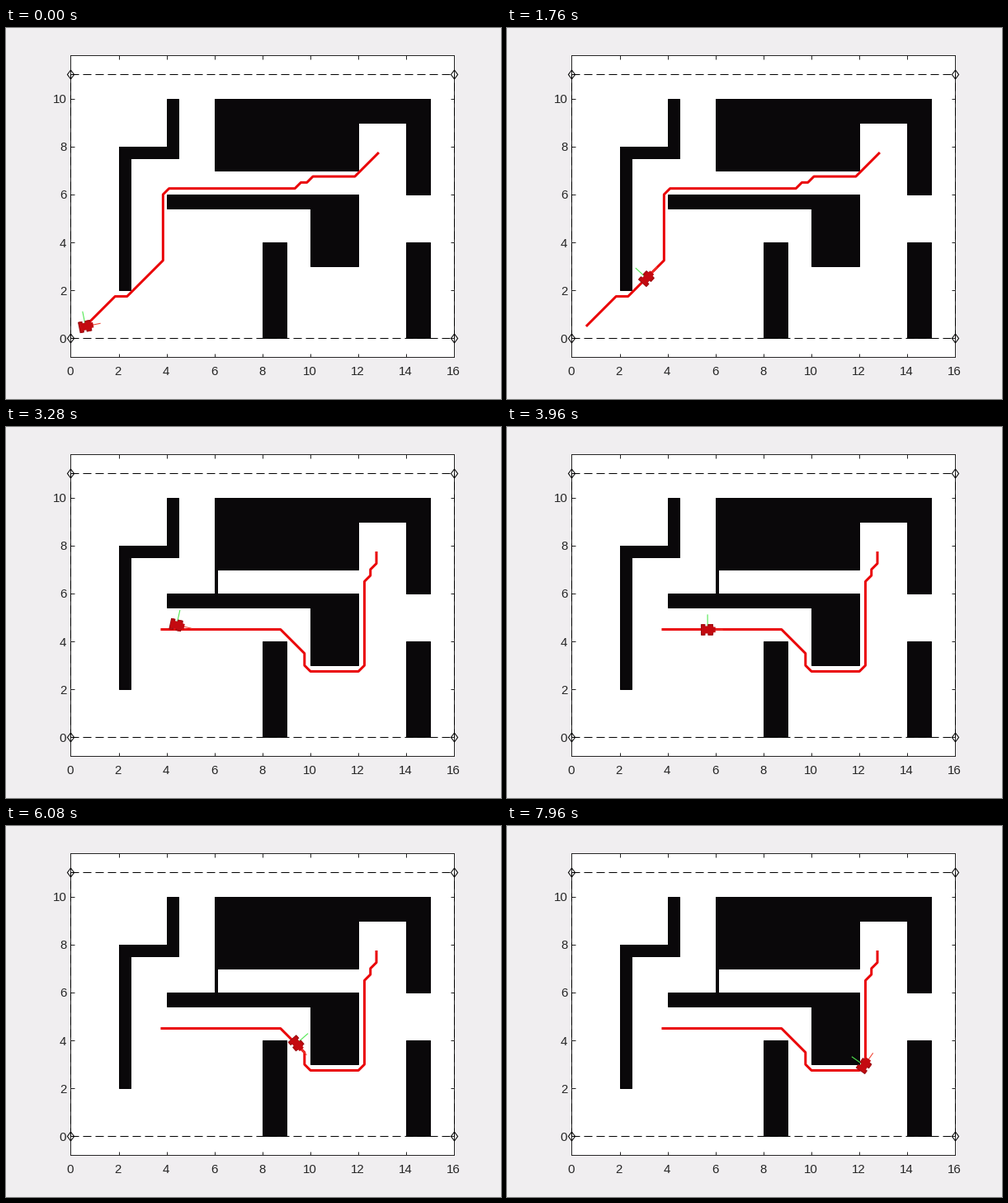
A matplotlib script that plays this animation: 600x450 px, repeating every 8000 ms.

```python
import math

import matplotlib.pyplot as plt
import numpy as np
from matplotlib.animation import FuncAnimation
from matplotlib.patches import Rectangle
from matplotlib.transforms import Affine2D

W, H, DPI = 600, 450, 100
FRAMES, INTERVAL = 200, 40
PX = 72 / DPI            # points per pixel
UNIT = 29.09             # pixels per map unit
LEFT, RIGHT, TOP, BOTTOM, ZERO = 78.45, 543.45, 33.45, 399.45, 376.45

CELL = 0.25              # planner grid
STEP = 0.075             # travel per frame
LOOKAHEAD = 0.5
MAX_TURN = 0.2           # radians per frame
REPLAN = 71              # frame at which the new wall appears

INK = "#0a080a"
GRAY = "#262626"
RED = "#ea0408"
BODY, WHEEL, TREAD = "#c40a10", "#b40c10", "#8c1016"


def grid_path(x, y, moves):
    """Follow compass moves such as 'NE5', counted in grid cells."""
    pts = [(x, y)]
    for move in moves.split():
        way = move.rstrip("0123456789")
        reach = int(move[len(way):]) * CELL
        x += reach * (("E" in way) - ("W" in way))
        y += reach * (("N" in way) - ("S" in way))
        pts.append((x, y))
    return np.array(pts)


FIRST_PATH = grid_path(0.6, 0.5, "NE5 E2 NE6 N11 NE1 E21 NE1 E1 NE1 E7 NE4")
SECOND_PATH = grid_path(3.75, 4.5, "E20 SE4 S2 SE1 E8 NE1 N14 NE1 N1 NE1 N2")


def current_path(i):
    return SECOND_PATH if i >= REPLAN else FIRST_PATH


def lookahead_point(path, pos):
    """Walk LOOKAHEAD along the path from the point nearest to pos."""
    best = None
    for i, (a, b) in enumerate(zip(path[:-1], path[1:])):
        d = b - a
        near = a + np.clip(np.dot(pos - a, d) / np.dot(d, d), 0, 1) * d
        gap = np.hypot(*(pos - near))
        if best is None or gap < best[0]:
            best = (gap, i, near)
    _, i, point = best
    left = LOOKAHEAD
    for end in path[i + 1:]:
        length = np.hypot(*(end - point))
        if length >= left:
            return point + (end - point) * left / length
        left -= length
        point = end
    return point


def drive():
    """Pure pursuit poses (x, y, heading), one per frame."""
    x, y, heading = 0.62, 0.5, MAX_TURN
    poses = []
    for i in range(FRAMES):
        poses.append((x, y, heading))
        tx, ty = lookahead_point(current_path(i), np.array([x, y]))
        alpha = math.atan2(ty - y, tx - x) - heading
        turn = 2 * STEP * math.sin(alpha) / LOOKAHEAD
        x += STEP * math.cos(heading)
        y += STEP * math.sin(heading)
        heading += max(-MAX_TURN, min(MAX_TURN, turn))
    return poses


POSES = drive()

fig = plt.figure(figsize=(W / DPI, H / DPI), dpi=DPI, facecolor="#f0eef0")
ax = fig.add_axes([LEFT / W, 1 - BOTTOM / H, (RIGHT - LEFT) / W, (BOTTOM - TOP) / H])
ax.set_xlim(0, 16)
ax.set_ylim((ZERO - BOTTOM) / UNIT, (ZERO - TOP) / UNIT)
ax.set_xticks(range(0, 17, 2))
ax.set_yticks(range(0, 11, 2))
ax.tick_params(direction="in", top=True, right=True, length=4.5 * PX,
               width=PX, color=GRAY, labelbottom=False, labelleft=False)
for spine in ax.spines.values():
    spine.set_linewidth(PX)
    spine.set_color(GRAY)

label = dict(family="Liberation Sans", fontsize=15 * PX, color=GRAY, va="baseline")
for v in range(0, 17, 2):
    ax.text(v - 0.8 / UNIT, -44.3 / UNIT, str(v), ha="center", **label)
for v in range(0, 11, 2):
    ax.text(-5.2 / UNIT, v - 5.5 / UNIT, str(v), ha="right", **label)


def block(x, y, w, h):
    return ax.add_patch(Rectangle((x, y), w, h, fc=INK, ec=INK, lw=PX,
                                  joinstyle="miter", snap=True, zorder=2))


# Bent wall, large room, hooked bar, two pillars
block(2, 2, 0.5, 6)
block(2, 7.5, 2.5, 0.5)
block(4, 7.5, 0.5, 2.5)
block(6, 7, 6, 3)
block(6, 9, 9, 1)
block(14, 6, 1, 4)
block(4, 5.4, 8, 0.6)
block(10, 3, 2, 3)
for x in (8, 14):
    block(x, 0, 1, 4)
new_wall = block(6, 6, 0.1, 1)

dash = dict(color="black", lw=PX, dashes=(10, 5), zorder=3, clip_on=False)
for y in (0, 11):
    ax.plot([0, 16], [y, y], **dash)
for x in (0, 16):
    ax.plot([x, x], [0, 11], **dash)
    ax.plot([x, x], [0, 11], ls="none", marker=[(0, 1), (0.75, 0), (0, -1), (-0.75, 0), (0, 1)],
            ms=11 * PX, mfc="none", mec="black", mew=PX, clip_on=False, zorder=4)

route, = ax.plot([], [], color=RED, lw=3 * PX, solid_joinstyle="round",
                 solid_capstyle="butt", zorder=5)

# Robot parts in pixels, facing +x
robot = []


def part(x, half, length, color):
    robot.append(ax.add_patch(Rectangle((x, -half), length, 2 * half,
                                        fc=color, lw=0, zorder=7)))


def axis_line(x, y, color):
    robot.extend(ax.plot([0, x], [0, y], color=color, lw=1.1 * PX, zorder=6))


axis_line(18, 0, "#f04838")
axis_line(0, 18, "#50e850")
for x, length in ((-8.3, 5.5), (0, 6.8)):
    part(x, 6.8, length, TREAD)
    part(x + 1, 6.8, length - 2, WHEEL)
part(-7.5, 4.5, 14.5, BODY)
part(6, 3.3, 3.5, BODY)


def draw(i):
    new_wall.set_visible(i >= REPLAN)
    route.set_data(*current_path(i).T)
    x, y, heading = POSES[i]
    place = Affine2D().rotate(heading).scale(1 / UNIT).translate(x, y) + ax.transData
    for piece in robot:
        piece.set_transform(place)
    return [new_wall, route, *robot]


anim = FuncAnimation(fig, draw, frames=FRAMES, interval=INTERVAL,
                     init_func=lambda: draw(0), repeat=True, repeat_delay=0, blit=False)
plt.show()
```
